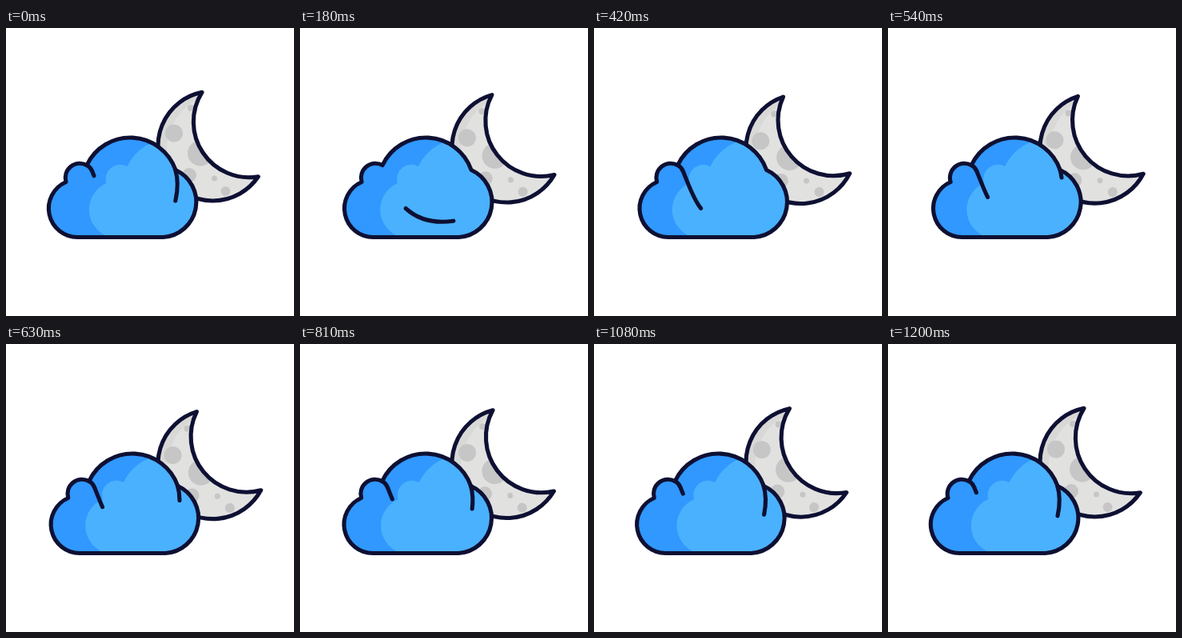
Write an HTML page that moves like this. It is 360 px wide and 360 px high and loops after 1.23 s.

```html
<!DOCTYPE html>
<html lang="en">
<head>
<meta charset="utf-8">
<title>Cloud and moon</title>
<style>
  html, body { margin: 0; height: 100%; overflow: hidden; background: #fff; }
  svg { display: block; width: 100vw; height: 100vh; }
  .line { fill: none; stroke: #0e1033; stroke-width: 5.1; stroke-linecap: round; stroke-linejoin: round; }
</style>
</head>
<body>
<svg viewBox="0 0 360 360">
  <defs>
    <path id="cloudShape" d="M90 261.500A36 36 0 0 1 75 192.500A18 18 0 0 1 101 171.500A60 60 0 0 1 212 177.500A44 44 0 0 1 196.500 261.500Z"/>
    <path id="moonShape" d="M245 80.300A68.500 68.500 0 1 0 315.300 185.800A69.500 69.500 0 0 1 245 80.300Z"/>
    <clipPath id="inCloud"><use href="#cloudShape"/></clipPath>
    <clipPath id="inMoon"><use href="#moonShape"/></clipPath>
  </defs>
  <g id="moon">
    <use href="#moonShape" fill="#d8d8d6"/>
    <g clip-path="url(#inMoon)" fill="#c6c6c6">
      <circle cx="271" cy="152" r="70" fill="#e1e1e0"/>
      <circle cx="210" cy="131.500" r="11"/>
      <circle cx="243" cy="156.500" r="16"/>
      <circle cx="229" cy="184" r="9"/>
      <circle cx="260.500" cy="188" r="3.5"/>
      <circle cx="274.500" cy="204" r="6"/>
      <circle cx="231" cy="100" r="4"/>
    </g>
    <use href="#moonShape" class="line"/>
  </g>
  <g id="cloud">
    <use href="#cloudShape" fill="#3098fe"/>
    <g clip-path="url(#inCloud)"><use id="light" href="#cloudShape" fill="#4ab1fe"/></g>
    <use href="#cloudShape" class="line"/>
    <path id="curl" class="line" stroke-dasharray="64 146"
      d="M211.500 176.500C214.500 186 215.500 199 212 215C209 230 203 240 191 241C165 245 146 240 130 225.500C121 214 115.500 198 109.500 183.500C107.500 177.500 105 173 101 171.500"/>
  </g>
</svg>
<script>
  const LOOP = 1230, PEAK = 330, PERIOD = 210;
  const [moon, cloud, light, curl] = ['moon', 'cloud', 'light', 'curl'].map(id => document.getElementById(id));
  const ease = x => (1 - Math.cos(Math.PI * x)) / 2;
  const swing = t => t < PEAK ? ease(t / PEAK) : ease((LOOP - t) / (LOOP - PEAK));
  const decay = t => Math.exp(-t / 280);
  const glide = t => (1 - decay(t)) / (1 - decay(LOOP));

  function draw(now) {
    const t = now % LOOP, w = swing(t);
    moon.setAttribute('transform', `rotate(${-7.5 * w} 286 150)`);
    cloud.setAttribute('transform', `translate(${3.7 * w} 0)`);
    light.setAttribute('transform', `translate(${50.5 - 10 * w} 1.5)`);
    curl.setAttribute('stroke-dashoffset', 25 - PERIOD * glide(t));
    requestAnimationFrame(draw);
  }
  draw(0);
</script>
</body>
</html>
```
